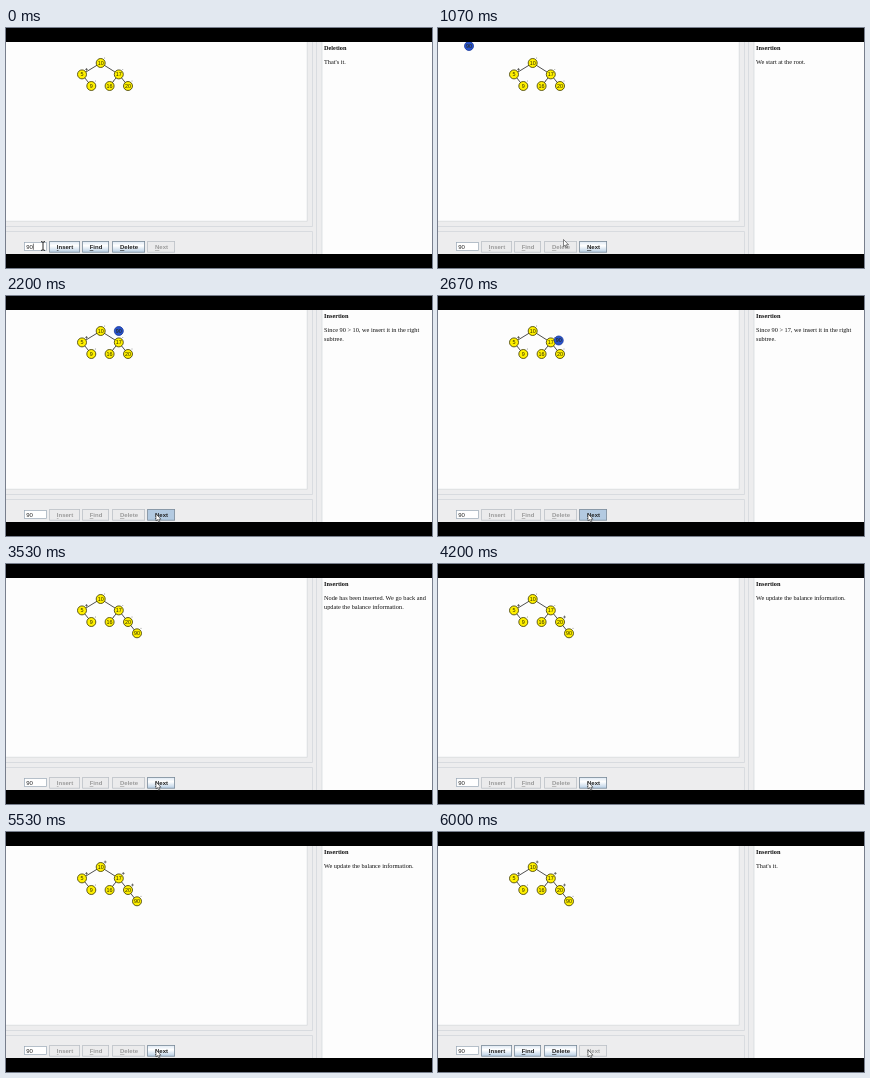
An HTML page for the animation above (6.07 s loop, 426 by 240 pixels).

```html
<!DOCTYPE html>
<html lang="en">
<head>
<meta charset="utf-8">
<title>Tree insertion</title>
<style>
html, body { margin: 0; width: 100%; height: 100%; overflow: hidden; background: #000; }
svg { display: block; width: 100vw; height: 100vh; }
.ui { font-family: "Liberation Sans", Arial, sans-serif; font-size: 6px; }
.btn { font-weight: bold; text-anchor: middle; }
.num { font-size: 5.4px; text-anchor: middle; fill: #2b2800; }
.doc { font-family: "Liberation Serif", "Times New Roman", serif; font-size: 6.3px; fill: #111; }
</style>
</head>
<body>
<svg id="stage" viewBox="0 0 426 240">
  <defs>
    <linearGradient id="face" x1="0" y1="0" x2="0" y2="1">
      <stop offset="0" stop-color="#dde8f3"/>
      <stop offset=".4" stop-color="#fff"/>
      <stop offset="1" stop-color="#b8cfe5"/>
    </linearGradient>
    <clipPath id="view"><rect y="14" width="301" height="179"/></clipPath>
  </defs>
  <rect width="426" height="240"/>
  <rect y="14" width="426" height="212" fill="#ededee"/>
  <rect y="14" width="301" height="179" fill="#fdfdfd"/>
  <rect x="316" y="14" width="110" height="212" fill="#fdfdfd"/>
  <path d="M0 193.2H301.2V14M316 14V226" fill="none" stroke="#cfd3d7" stroke-width=".6"/>
  <path d="M0 198.5H306.5V14M0 203.5H306.5V226M310.5 14V226" fill="none" stroke="#d3d7dc" stroke-width=".8"/>
  <g id="tree" clip-path="url(#view)"></g>
  <g id="bar" class="ui">
    <rect x="18.4" y="214.4" width="22.2" height="8.2" fill="#fff" stroke="#9aa8b6" stroke-width=".7"/>
    <text x="20.2" y="221" fill="#222">90</text>
    <path id="caret" d="M27.4 215.6V221.8" stroke="#222" stroke-width=".6"/>
  </g>
  <g class="doc">
    <text id="head" x="318" y="22.4" font-weight="bold"></text>
    <text id="line1" x="318" y="36"></text>
    <text id="line2" x="318" y="45"></text>
  </g>
  <path id="beam" d="M-2-4.4Q0-4.4 0-3.4Q0-4.4 2-4.4M0-3.4V3.4M-2 4.4Q0 4.4 0 3.4Q0 4.4 2 4.4" fill="none" stroke="#111" stroke-width=".9"/>
  <path id="arrow" d="M0 0V7L1.6 5.6L2.8 8.2L3.9 7.7L2.8 5.2H5Z" fill="#fff" stroke="#333" stroke-width=".6"/>
</svg>
<script>
const LOOP = 6070, STEP = LOOP / 91;
const $ = id => document.getElementById(id);

function add(parent, tag, attrs, text) {
  const el = document.createElementNS("http://www.w3.org/2000/svg", tag);
  for (const k in attrs) el.setAttribute(k, attrs[k]);
  if (text !== undefined) el.textContent = text;
  parent.appendChild(el);
  return el;
}
const show = (el, on) => el.setAttribute("visibility", on ? "visible" : "hidden");
const place = (el, [x, y]) => el.setAttribute("transform", `translate(${x} ${y})`);
const within = (t, [a, b]) => t >= a && t < b;

// Linear interpolation through [time, x, y] keys
function along(keys, t) {
  if (t <= keys[0][0]) return keys[0].slice(1);
  for (let i = 1; i < keys.length; i++) {
    const [t0, x0, y0] = keys[i - 1], [t1, x1, y1] = keys[i];
    if (t < t1) {
      const p = (t - t0) / (t1 - t0);
      return [x0 + (x1 - x0) * p, y0 + (y1 - y0) * p];
    }
  }
  return keys[keys.length - 1].slice(1);
}

// Times of the main events
const START = 870, APPEAR = 1000, LANDED = 3270, DONE = 5670;

const spots = {
  10: [94.7, 35], 5: [76, 46.4], 17: [112.8, 46.4],
  9: [85.3, 58], 16: [103.6, 58], 20: [122, 58], 90: [131, 69.3]
};
const links = [[10, 5], [10, 17], [5, 9], [17, 16], [17, 20], [20, 90]];
const plusAt = { 5: 0, 20: 3800, 17: 4400, 10: 5270 };

const tree = $("tree");
const edges = links.map(([a, b]) => add(tree, "line", {
  x1: spots[a][0], y1: spots[a][1], x2: spots[b][0], y2: spots[b][1],
  stroke: "#222", "stroke-width": .8
}));

function disc(value, fill) {
  const g = add(tree, "g", { class: "ui" });
  const ring = add(g, "circle", { r: 4.5, fill, stroke: "#3a3600", "stroke-width": .8 });
  add(g, "text", { class: "num", y: 1.9 }, value);
  return { g, ring };
}
const nodes = {};
for (const v in spots) {
  const n = nodes[v] = disc(v, "#fff000");
  place(n.g, spots[v]);
  n.dot = add(n.g, "circle", { cx: 4, cy: -5, r: .45, fill: "#444" });
  n.plus = add(n.g, "path", { d: "M3.1-5H5.9M4.5-6.4V-3.6", stroke: "#333", "stroke-width": .6 });
}
const mover = disc("90", "#2852cc");
mover.ring.setAttribute("stroke", "#1b3a9c");

const buttons = [["Insert", 44, 30], ["Find", 77, 26], ["Delete", 107, 32], ["Next", 142, 27]].map(([name, x, w]) => {
  const g = add($("bar"), "g", {});
  const face = add(g, "rect", { x: x - .4, y: 213.4, width: w, height: 10.8, "stroke-width": .8 });
  const label = add(g, "text", { class: "btn", x: x + w / 2, y: 221 });
  add(label, "tspan", { "text-decoration": "underline" }, name[0]);
  add(label, "tspan", {}, name.slice(1));
  return { name, face, label };
});

const pages = [
  [0, "Deletion", "That's it."],
  [APPEAR, "Insertion", "We start at the root."],
  [1870, "Insertion", "Since 90 > 10, we insert it in the right", "subtree."],
  [2530, "Insertion", "Since 90 > 17, we insert it in the right", "subtree."],
  [3000, "Insertion", "Node has been inserted. We go back and", "update the balance information."],
  [3800, "Insertion", "We update the balance information."],
  [DONE, "Insertion", "That's it."]
];
const presses = [[1830, 2260], [2470, 2740], [2950, 3140], [3730, 3870], [4330, 4470], [5200, 5340], [5600, DONE]];
const pointer = [[70, 37, 218], [600, 62, 217], [900, 64, 217], [1067, 125.5, 211.5], [1300, 150, 218]];
const flight = [
  [1010, 26.5, 17.4], [1067, 31, 18], [1840, 94.7, 24], [1870, 94.7, 24], [2130, 112.8, 35],
  [2530, 112.8, 35], [2690, 122, 46], [3000, 122, 46], [LANDED, 131, 69.3]
];

function draw(t) {
  const landed = t >= LANDED;
  for (const v in nodes) {
    const n = nodes[v], here = v !== "90" || landed;
    const plus = v in plusAt && t >= plusAt[v];
    show(n.g, here);
    show(n.plus, here && plus);
    show(n.dot, here && !plus);
  }
  nodes[17].ring.setAttribute("stroke-width", within(t, [4400, 5270]) ? 1.4 : .8);
  show(edges[5], landed);
  show(mover.g, t >= APPEAR && !landed);
  place(mover.g, along(flight, t));

  const busy = within(t, [START, DONE]);
  for (const { name, face, label } of buttons) {
    const next = name === "Next", on = next === busy;
    const down = next ? presses.some(p => within(t, p)) : name === "Insert" && within(t, [780, START]);
    face.setAttribute("fill", !on ? "#ebebec" : down ? "#b3cae1" : "url(#face)");
    face.setAttribute("stroke", on ? "#7a8a99" : "#bcc1c7");
    label.setAttribute("fill", on ? "#222" : "#9b9b9b");
  }

  const [, head, line1, line2 = ""] = pages.filter(p => t >= p[0]).pop();
  $("head").textContent = head;
  $("line1").textContent = line1;
  $("line2").textContent = line2;

  const pos = along(pointer, t), inField = pos[0] < 41;
  show($("caret"), t < 780);
  show($("beam"), inField);
  show($("arrow"), !inField);
  place($("beam"), pos);
  place($("arrow"), pos);
}

let begin;
function tick(now) {
  if (begin === undefined) begin = now;
  const t = (now - begin) % LOOP;
  draw(Math.floor((t + 4) / STEP) % 91 * STEP);
  requestAnimationFrame(tick);
}
draw(0);
requestAnimationFrame(tick);
</script>
</body>
</html>
```
